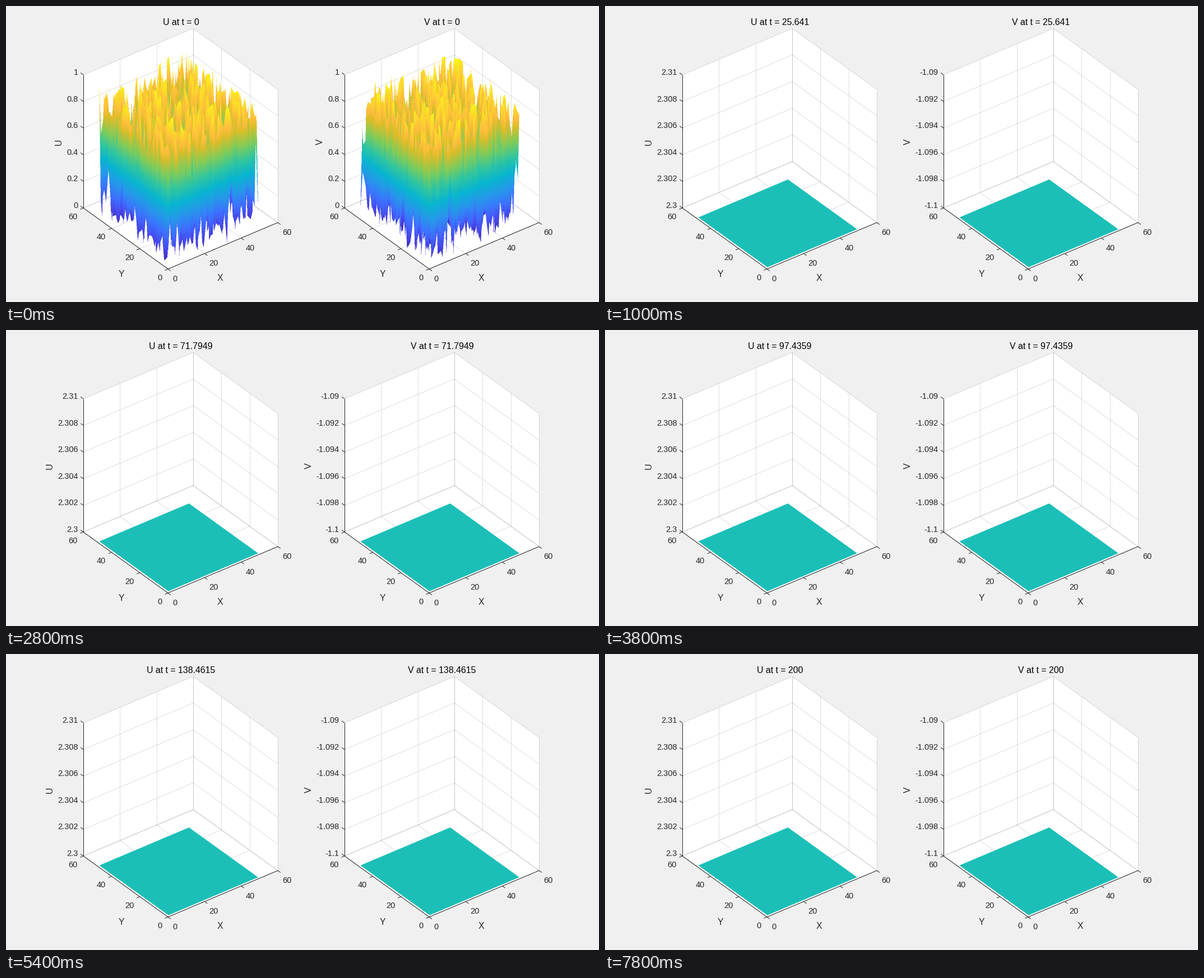
Recreate the animation shown at these times as a matplotlib script. Size 1058 by 529 pixels, loop 8 s.

```python
import numpy as np
import matplotlib.pyplot as plt
from matplotlib.animation import FuncAnimation
from matplotlib.colors import LinearSegmentedColormap

W, H, DPI = 1058, 529, 64
FRAMES, STEP, T_END = 40, 200, 200
N, SS = 50, 2                      # grid points per side, supersampling
INK, PAPER, FLAT = "#262626", "#f0f0f0", "#1bbfb8"
PT = 72 / DPI                      # points per pixel
SHIFT = 466                        # distance between the two panels

# Screen vectors of the projected axes
ORIGIN = np.array([289.0, 470.0])
EX = np.array([196.0, -83.0]) / 60
EY = np.array([-151.0, -109.0]) / 60
EZ = np.array([0.0, -238.0])

heat = LinearSegmentedColormap.from_list("heat", [
    (0, "#3e26a8"), (1 / 9, "#4747eb"), (2 / 9, "#3e6fff"), (3 / 9, "#2797eb"),
    (4 / 9, "#08b5d0"), (5 / 9, "#31c69f"), (6 / 9, "#81cc59"),
    (7 / 9, "#dcbd29"), (5 / 6, "#febd3d"), (1, "#f9fb15")], N=512)


def project(x, y, z, dx):
    return ORIGIN + (dx, 0) + x * EX + y * EY + z * EZ


plt.rcParams["font.family"] = "Liberation Sans"
fig = plt.figure(figsize=(W / DPI, H / DPI), dpi=DPI, facecolor=PAPER)
ax = fig.add_axes([0, 0, 1, 1])
ax.set_xlim(0, W)
ax.set_ylim(H, 0)
ax.axis("off")


def line(a, b, alpha=1, z=4):
    ax.plot([a[0], b[0]], [a[1], b[1]], color=INK, alpha=alpha,
            lw=PT, zorder=z, solid_capstyle="butt")


def label(x, y, s="", size=14.5, ha="center", color=INK, va="baseline", rot=0):
    return ax.text(x, y, s, fontsize=size * PT, ha=ha, va=va, color=color,
                   rotation=rot, rotation_mode="default", zorder=6)


def fill_triangle(buf, pts, vals):
    (x0, y0), (x1, y1), (x2, y2) = pts
    area = (x1 - x0) * (y2 - y0) - (x2 - x0) * (y1 - y0)
    if abs(area) < 1e-9:
        return
    lo = np.ceil(pts.min(axis=0)).astype(int)
    hi = np.floor(pts.max(axis=0)).astype(int) + 1
    gx = np.arange(lo[0], hi[0])[None, :]
    gy = np.arange(lo[1], hi[1])[:, None]
    b = ((gx - x0) * (y2 - y0) - (x2 - x0) * (gy - y0)) / area
    c = ((x1 - x0) * (gy - y0) - (gx - x0) * (y1 - y0)) / area
    a = 1 - b - c
    inside = (a > -1e-9) & (b > -1e-9) & (c > -1e-9)
    v = a * vals[0] + b * vals[1] + c * vals[2]
    buf[lo[1]:hi[1], lo[0]:hi[0]][inside] = v[inside]


def paint_surface(buf, heights, dx):
    """Back-to-front fill of the height field; heights[i, j] sits at (i+1, j+1)."""
    i, j = np.mgrid[1:N + 1, 1:N + 1][..., None]
    pts = project(i, j, heights[..., None], dx) * SS - .5
    for i in range(N - 2, -1, -1):
        for j in range(N - 2, -1, -1):
            for tip in ((i + 1, j + 1), (i, j)):
                tri = (tip, (i + 1, j), (i, j + 1))
                fill_triangle(buf, np.array([pts[k] for k in tri]),
                              [heights[k] for k in tri])


def surface_image():
    rng = np.random.default_rng(11)
    buf = np.full((H * SS, W * SS), np.nan)
    for dx in (0, SHIFT):
        paint_surface(buf, rng.random((N, N)), dx)
    rgba = heat(np.nan_to_num(buf)) * ~np.isnan(buf)[..., None]
    rgba = rgba.reshape(H, SS, W, SS, 4).mean(axis=(1, 3))
    rgba[..., :3] /= np.maximum(rgba[..., 3:], 1e-6)
    return np.clip(rgba, 0, 1)


surface = ax.imshow(surface_image(), extent=(0, W, H, 0),
                    interpolation="none", aspect="auto", zorder=3)


class Panel:
    def __init__(self, name, dx, base, name_x):
        self.name, self.name_x = name, name_x
        self.p = lambda x, y, z=0: project(x, y, z, dx)
        p = self.p

        shell = [p(0, 0), p(60, 0), p(60, 0, 1), p(60, 60, 1),
                 p(0, 60, 1), p(0, 60)]
        ax.add_patch(plt.Polygon(shell, fc="white", ec="none", zorder=0))
        sheet = [p(1, 1), p(N, 1), p(N, N), p(1, N)]
        self.sheet = ax.add_patch(
            plt.Polygon(sheet, fc=FLAT, ec="none", zorder=3))
        self.draw_grid()
        self.draw_axes(dx)

        self.z_text = [label(128.5 + dx, 361 - 47.6 * k, ha="right")
                       for k in range(6)]
        self.z_start = [f"{k / 5:g}" for k in range(6)]
        self.z_later = [f"{base + .002 * k:.4g}" for k in range(6)]
        self.title = label(312 + dx, 34.5, size=15.84, color="black")
        label(382 + dx, 491, "X", 15.84)
        label(206 + dx, 484.5, "Y", 15.84)
        self.z_name = label(0, 243, name, 15.84, va="center", rot=90)

    def draw_grid(self):
        p = self.p
        rules = []
        for v in range(0, 61, 20):
            rules += [(p(v, 0), p(v, 60)), (p(0, v), p(60, v)),
                      (p(v, 60), p(v, 60, 1)), (p(60, v), p(60, v, 1))]
        for z in np.arange(6) / 5:
            rules += [(p(0, 60, z), p(60, 60, z)), (p(60, 0, z), p(60, 60, z))]
        for a, b in rules:
            line(a, b, alpha=.15, z=1)

    def draw_axes(self, dx):
        p = self.p
        for a, b in ((p(0, 0), p(60, 0)), (p(0, 0), p(0, 60)),
                     (p(0, 60), p(0, 60, 1))):
            line(a, b)
        tick_x = EX / np.hypot(*EX) * 6
        tick_y = EY / np.hypot(*EY) * 6
        for k in range(4):
            v = 20 * k
            line(p(v, 0), p(v, 0) - tick_y)
            line(p(0, v), p(0, v) - tick_x)
            label(297 + dx + 65.4 * k, 492 - 27.67 * k, v, ha="left")
            label(278.5 + dx - 50.3 * k, 490 - 36.4 * k, v, ha="right")
        for z in np.arange(6) / 5:
            line(p(0, 60, z), p(0, 60, z) + tick_y)

    def show(self, first, time):
        self.title.set_text(f"{self.name} at t = {time}")
        self.sheet.set_visible(not first)
        self.z_name.set_x(self.name_x[0 if first else 1])
        for text, s in zip(self.z_text, self.z_start if first else self.z_later):
            text.set_text(s)


panels = [Panel("U", 0, 2.3, (94, 78)),
          Panel("V", SHIFT, -1.1, (560, 540))]


def update(n):
    time = f"{T_END * n / (FRAMES - 1):.4f}".rstrip("0").rstrip(".")
    surface.set_visible(n == 0)
    for panel in panels:
        panel.show(n == 0, time)
    return []


anim = FuncAnimation(fig, update, frames=FRAMES, interval=STEP,
                     init_func=lambda: update(0), repeat=True,
                     repeat_delay=0, blit=False)
plt.show()
```
